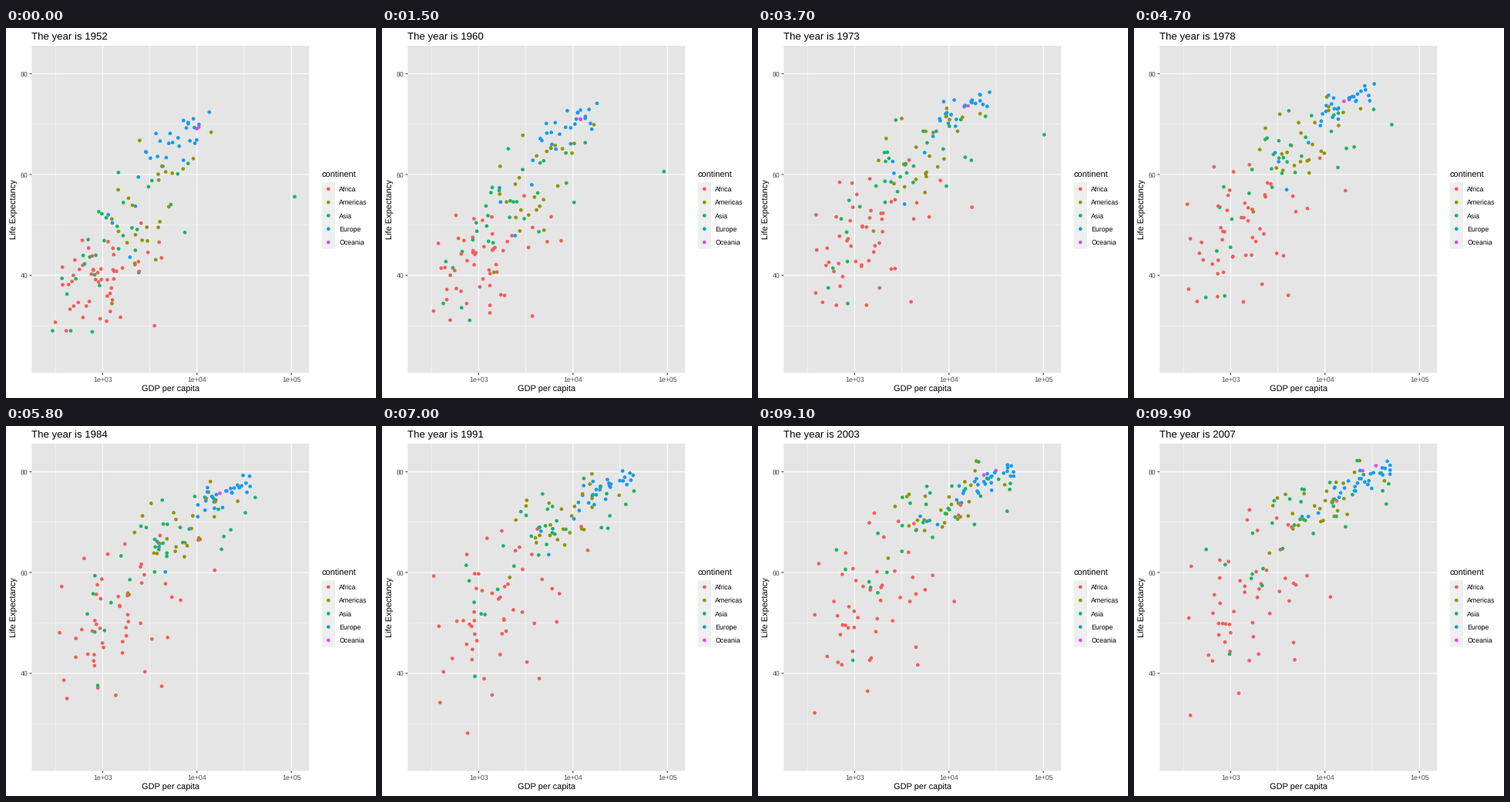
Write a matplotlib script that moves like this. It is 480 px wide and 480 px high and loops after 10000 ms.

```python
import numpy as np
import matplotlib.pyplot as plt
from matplotlib.animation import FuncAnimation
from matplotlib.patches import Rectangle

plt.rcParams.update({"font.family": "Liberation Sans", "text.hinting": "none",
                     "text.kerning_factor": 0})

SIZE, DPI = 480, 72
FRAMES, STEP = 100, 9          # frames between two survey waves
WAVES = np.arange(1952, 2008, 5)
LEFT, TOP, RIGHT, BOTTOM = 33.3, 23.0, 393.3, 447.4
X_RANGE, Y_RANGE = (2.2485, 5.1887), (20.65, 85.55)
COLORS = {"Africa": "#f15f5a", "Americas": "#949400", "Asia": "#1cb565",
          "Europe": "#159cf0", "Oceania": "#dd4dec"}
rng = np.random.default_rng(7)


def px(log_gdp):
    lo, hi = X_RANGE
    return LEFT + (log_gdp - lo) / (hi - lo) * (RIGHT - LEFT)


def py(life):
    lo, hi = Y_RANGE
    return BOTTOM - (life - lo) / (hi - lo) * (BOTTOM - TOP)


def drift(start, end):
    """Fast early growth that levels off, one row per wave."""
    u = np.linspace(0, 1, len(WAVES))[:, None]
    return end + (start - end) * (1 - u) ** 1.6


def ranks(n):
    """Standard scores that slowly reshuffle from wave to wave."""
    z = rng.normal(size=(2, n))
    z = (z - z.mean(1, keepdims=True)) / z.std(1, keepdims=True)
    turn = np.linspace(0, 0.8, len(WAVES))[:, None]
    return np.clip(np.cos(turn) * z[0] + np.sin(turn) * z[1], -2.1, 2.1)


def cloud(n, gdp, gdp_sd, life, life_sd, corr, skew=0):
    """Correlated countries, as an array of wave x country x (gdp, life)."""
    zx = ranks(n)
    zx += skew * (zx ** 2 - 1)
    zy = corr * zx + np.sqrt(1 - corr ** 2) * ranks(n)
    x = drift(*gdp) + drift(*gdp_sd) * zx + rng.normal(0, 0.025, zx.shape)
    y = drift(*life) + drift(*life_sd) * zy + rng.normal(0, 0.4, zy.shape)
    return np.dstack([np.clip(x, 2.42, 4.69), np.clip(y, 29, 82.2)])


def path(*stops):
    """One outlying country through (year, log gdp, life) stops."""
    years, gdp, life = zip(*stops)
    return np.dstack([np.interp(WAVES, years, gdp)[:, None],
                      np.interp(WAVES, years, life)[:, None]])


GROUPS = [
    ("Africa", cloud(49, (2.98, 3.21), (.26, .38), (39.3, 55.2), (5, 9.3),
                     .45, .12)),
    ("Africa", path((1952, 2.69, 40), (1987, 2.93, 44), (1992, 2.87, 23.6),
                    (1997, 2.77, 36.1), (2007, 2.94, 46.2))),
    ("Africa", path((1952, 3.38, 42.7), (1967, 4.27, 50.2), (2007, 4.08, 74))),
    ("Africa", path((1952, 3.55, 30), (2007, 3.68, 42.7))),
    ("Americas", cloud(24, (3.47, 3.92), (.22, .26), (53, 73.4), (8.5, 4), .6)),
    ("Americas", path((1952, 4.15, 68.4), (2007, 4.63, 78.2))),
    ("Asia", cloud(30, (3.15, 3.83), (.36, .52), (47.2, 71.3), (8, 6.2), .65)),
    ("Asia", path((1952, 5.035, 55.6), (1967, 4.908, 64.6),
                  (1972, 5.039, 67.7), (1982, 4.497, 71.3),
                  (2007, 4.675, 77.6))),
    ("Asia", path((1952, 2.57, 39.4), (1967, 2.72, 45.4), (1977, 2.72, 31.2),
                  (1982, 2.80, 51), (2007, 3.23, 59.7))),
    ("Asia", path((1952, 2.89, 28.8), (2007, 2.99, 43.8))),
    ("Europe", cloud(29, (3.71, 4.38), (.25, .24), (65.1, 77.8), (5, 2.7),
                     .85, -.15)),
    ("Europe", path((1952, 3.29, 43.6), (2007, 3.93, 71.8))),
    ("Oceania", path((1952, 4.00, 69.1), (2007, 4.54, 81.2))),
    ("Oceania", path((1952, 4.02, 69.4), (2007, 4.40, 80.2))),
]

tracks = np.concatenate([g for _, g in GROUPS], axis=1)
colors = np.concatenate([[COLORS[name]] * g.shape[1] for name, g in GROUPS])
order = rng.permutation(len(colors))
tracks, colors = tracks[:, order], colors[order]
tracks = np.dstack([px(tracks[..., 0]), py(tracks[..., 1])])

fig = plt.figure(figsize=(SIZE / DPI, SIZE / DPI), dpi=DPI, facecolor="white")
ax = fig.add_axes([0, 0, 1, 1])
ax.set(xlim=(0, SIZE), ylim=(SIZE, 0))
ax.axis("off")


def box(x, y, w, h, color):
    ax.add_patch(Rectangle((x, y), w, h, fc=color, lw=0, snap=False, zorder=0))


def line(xs, ys, width, color="white"):
    ax.plot(xs, ys, color=color, lw=width, solid_capstyle="butt",
            snap=False, zorder=1)


def label(x, y, text, size, color="black", **kw):
    return ax.text(x, y, text, size=size, color=color, va="baseline", **kw)


def dots(xy, c):
    return ax.scatter(*np.transpose(xy), s=4.7 ** 2, c=c, lw=0, zorder=3)


# Panel, grid and axes
box(LEFT, TOP, RIGHT - LEFT, BOTTOM - TOP, "#e5e5e5")
for v in (2.5, 3.5, 4.5):
    line([px(v)] * 2, [TOP, BOTTOM], 0.53)
for v in (30, 50, 70):
    line([LEFT, RIGHT], [py(v)] * 2, 0.53)
for v in (3, 4, 5):
    line([px(v)] * 2, [TOP, BOTTOM], 1.07)
    line([px(v)] * 2, [BOTTOM, BOTTOM + 2.75], 1.07, "#333333")
    label(px(v), 459.4, f"1e+{v:02d}", 8.8, "#4d4d4d", ha="center")
for v in (40, 60, 80):
    line([LEFT, RIGHT], [py(v)] * 2, 1.07)
    line([LEFT - 2.75, LEFT], [py(v)] * 2, 1.07, "#333333")
    label(28.4, py(v) + 3.5, str(v), 8.8, "#4d4d4d", ha="right")
label((LEFT + RIGHT) / 2, 472, "GDP per capita", 11, ha="center")
label(14, (TOP + BOTTOM) / 2, "Life Expectancy", 11, ha="center",
      rotation=90, rotation_mode="anchor")
title = label(LEFT, 15, "", 13.2)

# Legend
KEY = 17.28
KEY_X, KEY_Y = 409.6, 200.2
label(409.3, 194, "continent", 11)
centers = [(KEY_X + KEY / 2, KEY_Y + KEY * (i + 0.5))
           for i in range(len(COLORS))]
for name, (x, y) in zip(COLORS, centers):
    box(KEY_X, y - KEY / 2, KEY, KEY, "#efefef")
    label(432.2, y + 3.2, name, 8.8)
dots(centers, list(COLORS.values()))

points = dots(tracks[0], colors)


def update(i):
    wave = min(i // STEP, len(WAVES) - 2)
    t = i / STEP - wave
    points.set_offsets((1 - t) * tracks[wave] + t * tracks[wave + 1])
    title.set_text(f"The year is {1952 + 5 * i / STEP:.0f}")
    return points, title


anim = FuncAnimation(fig, update, frames=FRAMES, interval=100,
                     repeat=True, repeat_delay=0)
plt.show()
```
